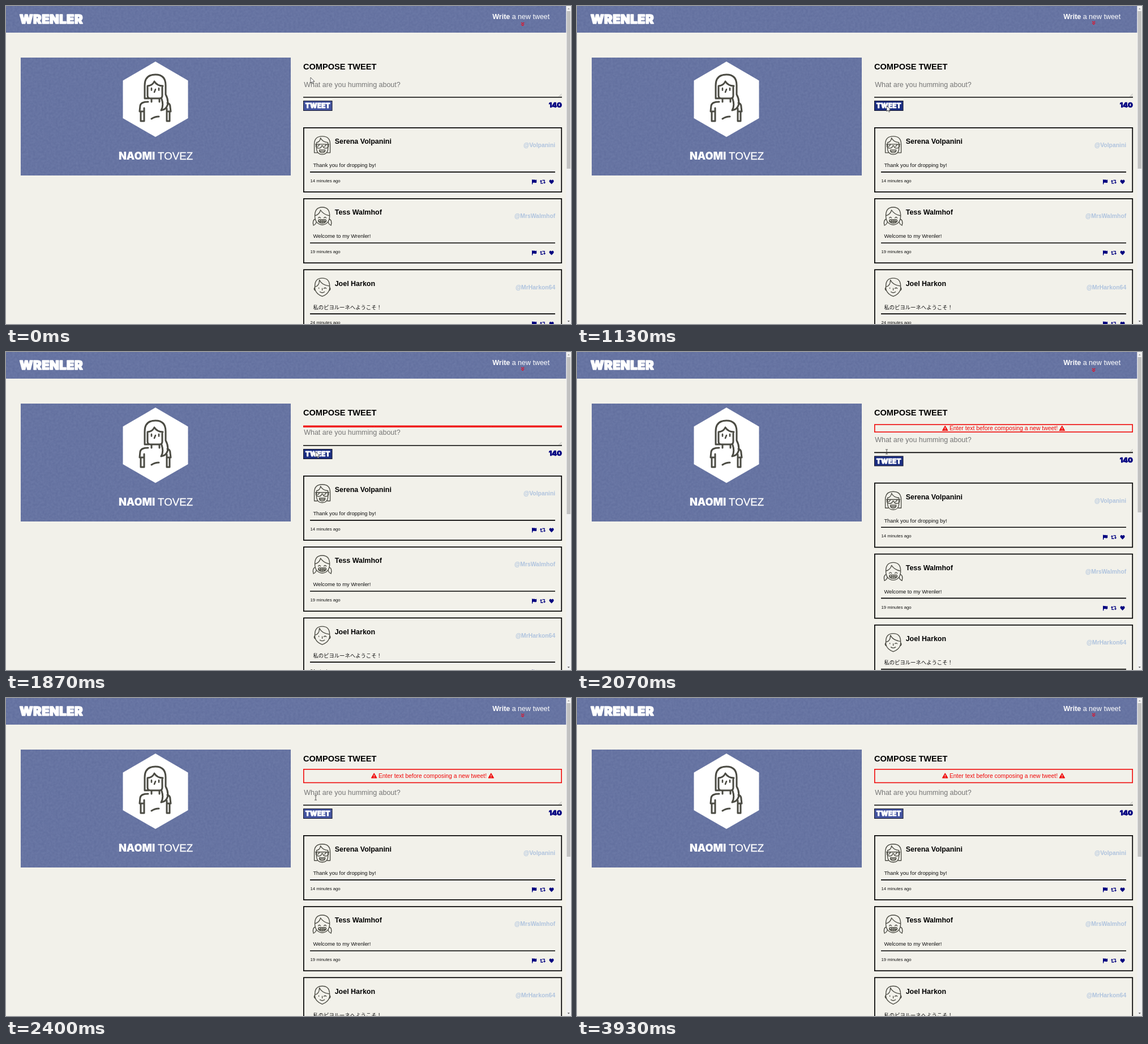
These frames come from a looping animation (998 px wide and 561 px high, 3990 ms). An HTML page:

```html
<!DOCTYPE html>
<html lang="en">
<head>
<meta charset="utf-8">
<title>Compose tweet</title>
<style>
  html, body { margin: 0; width: 100%; height: 100%; overflow: hidden; background: #f2f1ea; }
  svg { position: absolute; left: 0; top: 0; will-change: transform; }
  text { font-family: "Liberation Sans", Arial, sans-serif; white-space: pre; }
  .b { font-weight: 700; }
  .fat { font-family: Inter, sans-serif; font-weight: 900; stroke-linejoin: round; }
  .jp { font-family: "Noto Sans CJK JP", "Noto Sans CJK", sans-serif; font-weight: 300; }
  .line { fill: none; stroke: #4b4b43; stroke-linecap: round; stroke-linejoin: round; }
</style>
</head>
<body>
<svg width="998" height="561" viewBox="0 0 998 561">
  <filter id="grain" x="0" y="0" width="100%" height="100%" color-interpolation-filters="sRGB">
    <feTurbulence type="fractalNoise" baseFrequency=".25" numOctaves="3" seed="4"/>
    <feColorMatrix values=".06 0 0 0 .373  .06 0 0 0 .425  .05 0 0 0 .611  0 0 0 0 1"/>
  </filter>
  <rect width="990" height="46.8" filter="url(#grain)"/>
  <rect x="26" y="91" width="476.8" height="207.7" filter="url(#grain)"/>
  <path d="M264 98L321.5 131.5V198L264 231L206.5 198V131.5Z" fill="#fff"/>
  <g class="line" stroke-width="3">
    <path d="M252 163H245V140Q245 121 264 121Q282 121 282 140V156Q287 165 285.5 174Q283 183 274 184Q279 176 275 164"/>
    <path d="M250 141V158Q250 163 255 163H271Q276 163 276 158V141M250 141Q259 140 262 133Q267 141 277 141M257 164V169M271 164V169"/>
    <path d="M257 145V148.5M270 145V148.5M264 147L262 152" stroke-width="2.6"/>
    <path d="M251 169Q238 169 237 176L236 186H244M244 180V203H238V187M285 171Q290 172 290 178L291 186H284M284 181V203H289V187M257 199Q263 195 270 195"/>
  </g>
  <text class="fat" x="24" y="31.1" font-size="21.8" letter-spacing=".5" fill="#fff" stroke="#fff" stroke-width="1.6">WRENLER</text>
  <text x="264.5" y="271.2" font-size="18.72" fill="#fff" text-anchor="middle"><tspan class="fat" font-size="18.2">NAOMI</tspan> <tspan stroke="#fff" stroke-width=".3">TOVEZ</tspan></text>
  <text x="859.3" y="23" font-size="12.48" fill="#fff"><tspan class="b">Write</tspan> a new tweet</text>
  <text class="b" x="525" y="111.5" font-size="14.56">COMPOSE TWEET</text>
</svg>

<svg width="998" height="561" viewBox="0 0 998 561">
  <defs><clipPath id="inner"><rect id="innerBox" x="526.6" width="453.8"/></clipPath></defs>
  <path id="chevron" d="M-2.6-2.6L0-.3L2.6-2.6M-2.6.6L0 2.9L2.6 .6" fill="none" stroke="#e0142c" stroke-width="1.3"/>
  <g id="alert" fill="#f00a0a">
    <rect id="alertBox" x="525.8" width="455.4" fill="none" stroke="#f00a0a" stroke-width="1.6"/>
    <g clip-path="url(#inner)"><g id="alertText"></g></g>
  </g>
  <g id="flow">
    <text x="526.2" y="142.5" font-size="12.48" fill="#757575">What are you humming about?</text>
    <path d="M976.5 160L981.5 155M979.5 160L981.5 158" stroke="#888" stroke-width=".6"/>
    <path d="M525 161H982" stroke="#000" stroke-width="1.7"/>
    <rect id="button" x="525.5" y="167.5" width="50.5" height="17" stroke="#15172b"/>
    <text class="fat" x="550.8" y="180.2" font-size="11.6" letter-spacing=".3" fill="#fff" stroke="#fff" stroke-width=".9" text-anchor="middle">TWEET</text>
    <text class="fat" x="981.8" y="178.8" font-size="12.4" fill="navy" stroke="navy" stroke-width=".7" text-anchor="end">140</text>
    <g id="cards"></g>
  </g>
  <rect x="989.3" width="8.7" height="561" fill="#f1f1f1"/>
  <rect id="thumb" x="990.5" y="9" width="6.5" fill="#c1c1c1"/>
  <path d="M991.8 6L993.8 3.6L995.8 6Z" fill="#a3a3a3"/>
  <path d="M991.8 555.2L993.8 557.6L995.8 555.2Z" fill="#505050"/>
  <path id="arrow" d="M0 0V10L2.4 7.8L4 11.2L5.6 10.5L4.1 7.2H7Z" fill="#fff" stroke="#222" stroke-width=".7"/>
  <path id="beam" d="M-2-4H-.5Q0-4 0-3.4Q0-4 .5-4H2M0-3.4V3.4M-2 4H-.5Q0 4 0 3.4Q0 4 .5 4H2" fill="none" stroke="#333" stroke-width=".8"/>
</svg>

<script>
const LOOP = 3990;
const $ = id => document.getElementById(id);
const set = (id, attrs) => Object.entries(attrs).forEach(([k, v]) => $(id).setAttribute(k, v));
const clamp = x => Math.max(0, Math.min(1, x));
const span = (t, from, to) => clamp((t - from) / (to - from));
const swing = p => .5 - Math.cos(Math.PI * p) / 2;
const mix = (a, b, p) => a + (b - a) * p;

// Faces are drawn around their own centre.
const faces = {
  glasses: `<path d="M-9 13H-14V-2Q-14-16 0-16T14-2V13H9M-10-5V7Q-9 16 0 16T10 7V-5M-10-5Q-4-6-3-13Q0-6 10-5"/>
    <path d="M-12-2H12M-11-2V2Q-10 5-6 5T-1 1Q0 0 1 1Q2 5 6 5T11 2V-2M-8 2L-5-1M4 2L7-1M-5 8H5V10Q4 13 0 13T-5 10ZM-4 10.5H4"/>`,
  pigtails: `<path d="M-13 1Q-14-16 0-16T13 1Q12 14 0 15Q-12 14-13 1ZM-13-1Q-5-3-3-11Q2-3 13-1"/>
    <path d="M-12.5 5Q-18 7-15.5 16Q-11 14-10.5 10M12.5 5Q18 7 15.5 16Q11 14 10.5 10M-7 3Q-5 0-3 3M3 3Q5 0 7 3"/>
    <path d="M-6 6H6Q8 8 6 10Q4 12 0 12T-6 10Q-8 8-6 6ZM-6 9H6M-3 6V11.5M0 6V12M3 6V11.5"/>`,
  wink: `<path d="M-13-2Q-13-16 0-16T13-2V3Q11 12 0 16Q-11 12-13 3ZM-13-1Q-5-2-5-13Q-1-4 13-2M-13 0Q-16 4-12 6M13 0Q16 4 12 6"/>
    <path d="M-6 1V2M3 2Q5 0 7 2M0 2V5M-4 8Q0 11 4 8"/>`
};

const icons = `<g fill="navy">
  <path d="M404 92V100.6H405.3V98Q407.2 97 408.7 97.7T412.2 97.4V92.3Q410.4 93.2 408.8 92.6T405.3 92.7V92Z"/>
  <path d="M417.8 95.4L420 92.7L422.2 95.4ZM423.9 96.9L426.1 99.6L428.3 96.9Z"/>
  <path d="M420 95V98.8H423.6M422.4 93.5H426.1V97.2" fill="none" stroke="navy" stroke-width="1.3"/>
  <path d="M438.6 100.3L435.2 96.8C433.2 94.2 436.6 90.8 438.6 93.7C440.6 90.8 444 94.2 442 96.8Z"/></g>`;

const card = ({ name, handle, body, age, face, font = "" }, i) => `
  <g transform="translate(525 ${214 + i * 125.2})">
    <rect x=".85" y=".85" width="455.4" height="113.2" fill="none" stroke="#000" stroke-width="1.7"/>
    <g class="line" stroke-width="1.35" transform="translate(33.6 31.8)">${faces[face]}</g>
    <text class="b" x="55.7" y="29.2" font-size="12.48">${name}</text>
    <text class="b" x="445.2" y="35.3" font-size="10.4" fill="#b0c4de" text-anchor="end">${handle}</text>
    <text class="${font}" x="17.4" y="70.2" font-size="9.36" fill="#111">${body}</text>
    <path d="M12 78.8H445" stroke="#000" stroke-width="1.7"/>
    <text x="12.4" y="97" font-size="7.8" fill="#111">${age} minutes ago</text>
    ${icons}
  </g>`;

$("cards").innerHTML = [
  { name: "Serena Volpanini", handle: "@Volpanini", body: "Thank you for dropping by!", age: 14, face: "glasses" },
  { name: "Tess Walmhof", handle: "@MrsWalmhof", body: "Welcome to my Wrenler!", age: 19, face: "pigtails" },
  { name: "Joel Harkon", handle: "@MrHarkon64", body: "私のピヨルーネへようこそ！", age: 24, face: "wink", font: "jp" }
].map(card).join("");

const warning = x => `<g transform="translate(${x} 0)">
  <path d="M0-4.4L4.8 4H-4.8Z" stroke="#f00a0a" stroke-width="1" stroke-linejoin="round"/>
  <path d="M0-1.6V1.3M0 2.3V3.5" stroke="#f2f1ea" stroke-width="1.2"/></g>`;
$("alertText").innerHTML = `${warning(650.2)}${warning(856.8)}
  <text x="753.5" y="3.7" font-size="10.4" text-anchor="middle">Enter text before composing a new tweet!</text>`;

function draw(t) {
  const bob = 30.7 - 1.2 * Math.cos((t - 1130) / 700 * 2 * Math.PI);
  set("chevron", { transform: `translate(912.6 ${bob})` });

  // The alert slides open and pushes everything below it down.
  const open = swing(span(t, 1712, 2358));
  const top = 130.4 - 5.4 * open;
  const height = Math.max(3.2, 150.2 - 20 * (1 - open) - top);
  set("alert", { visibility: t > 1712 ? "visible" : "hidden" });
  set("alertBox", { y: top + .8, height: height - 1.6 });
  set("innerBox", { y: top + 1.5, height: Math.max(.2, height - 3) });
  set("alertText", { transform: `translate(0 ${top + .7 + 11.4 * open})` });
  set("flow", { transform: `translate(0 ${28 * open})` });
  set("thumb", { height: 278 - 7 * open });

  const hover = span(t, 800, 950) - span(t, 2080, 2230);
  const [r, g, b] = [[68, 27], [84, 46], [160, 130]].map(([rest, over]) => Math.round(mix(rest, over, hover)));
  set("button", { fill: `rgb(${r},${g},${b})` });

  const move = swing(span(t, 150, 900));
  const x = mix(538, 547, move), y = mix(126, 176, move);
  const overField = (y > 127 && y < 161) || t > 1990;
  const shown = t < 2700;
  set("arrow", { transform: `translate(${x} ${y})`, visibility: shown && !overField ? "visible" : "hidden" });
  set("beam", { transform: `translate(${x} ${y})`, visibility: shown && overField ? "visible" : "hidden" });
}

const start = performance.now();
function tick() {
  draw((performance.now() - start) % LOOP);
  requestAnimationFrame(tick);
}
tick();
</script>
</body>
</html>
```
